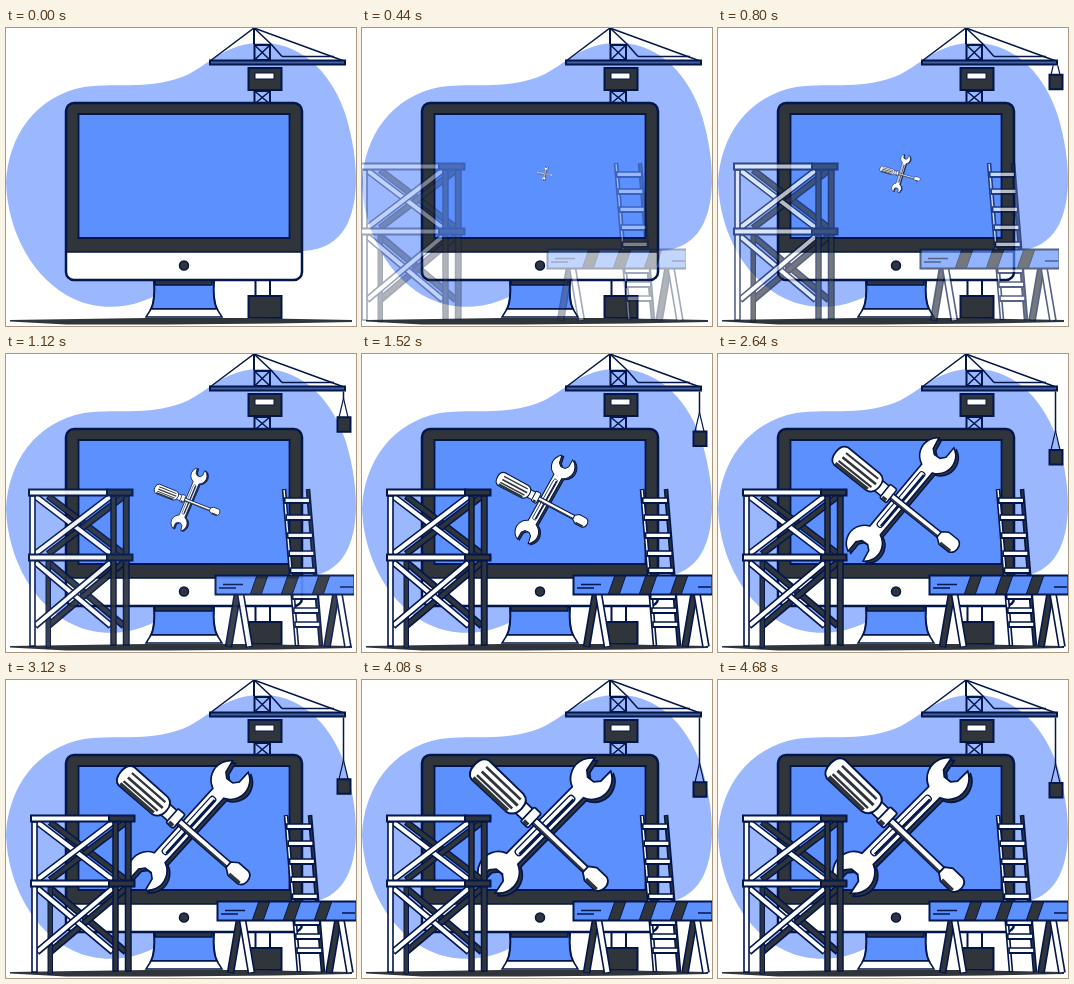
Animation, 350 px wide and 298 px high, one loop 4.8 s. Source, as an HTML page with a canvas:

```html
<!DOCTYPE html>
<html>
<head>
<meta charset="utf-8">
<style>
  html, body { margin: 0; width: 100%; height: 100%; overflow: hidden; background: #fff; }
  canvas { display: block; width: 350px; height: 298px; }
</style>
</head>
<body>
<canvas id="stage" width="350" height="298"></canvas>
<script>
const ctx = document.getElementById('stage').getContext('2d');
const NAVY = '#02164a', DARK = '#2f353b', BLUE = '#5d90ff', PALE = '#9bb8ff', WHITE = '#fff';
const LOOP = 4800, STEP = 40, LAST = 4680;

function paint(path, fill, stroke = NAVY, width = 2) {
  if (fill) { ctx.fillStyle = fill; ctx.fill(path); }
  if (stroke) { ctx.strokeStyle = stroke; ctx.lineWidth = width; ctx.stroke(path); }
}

function poly(points, fill, stroke, width) {
  const path = new Path2D();
  points.forEach(([x, y]) => path.lineTo(x, y));
  path.closePath();
  paint(path, fill, stroke, width);
}

function box(x, y, w, h, fill, stroke, width, radius = 0) {
  const path = new Path2D();
  path.roundRect(x, y, w, h, radius);
  paint(path, fill, stroke, width);
}

function line(x1, y1, x2, y2, width = 1.5, color = NAVY) {
  ctx.strokeStyle = color;
  ctx.lineWidth = width;
  ctx.beginPath();
  ctx.moveTo(x1, y1);
  ctx.lineTo(x2, y2);
  ctx.stroke();
}

// An outlined plank between two points.
function plank(x1, y1, x2, y2, width, fill = WHITE) {
  line(x1, y1, x2, y2, width + 1.6);
  const len = Math.hypot(x2 - x1, y2 - y1);
  const dx = (x2 - x1) / len, dy = (y2 - y1) / len;
  line(x1 + dx, y1 + dy, x2 - dx, y2 - dy, width - 1.6, fill);
}

// cubic-bezier(.25, .1, .25, 1)
function ease(u) {
  if (u <= 0) return 0;
  if (u >= 1) return 1;
  const curve = (s, a, b) => 3 * s * (1 - s) * (1 - s) * a + 3 * s * s * (1 - s) * b + s * s * s;
  let lo = 0, hi = 1;
  for (let i = 0; i < 24; i++) {
    const mid = (lo + hi) / 2;
    if (curve(mid, 0.25, 0.25) < u) lo = mid; else hi = mid;
  }
  return curve(lo, 0.1, 1);
}

function drawBlob() {
  paint(new Path2D(`M0 155 C2 108 30 68 78 59 C114 54 146 63 183 46
    C207 33 222 14 258 15 C300 16 328 50 340 88 C347 112 350 132 350 154
    C349 186 340 221 297 223 C230 228 190 238 165 257
    C138 280 98 285 68 271 C28 252 2 206 0 155 Z`), PALE, null);
}

function drawBrace(top, bottom) {
  box(248.5, top, 15.5, bottom - top, PALE, NAVY, 2);
  line(248.5, top, 264, bottom);
  line(264, top, 248.5, bottom);
}

function drawCrane(t) {
  line(248, 0, 204, 33);
  line(248, 0, 338, 33);
  line(248, 0, 265, 16);
  line(265, 16, 276, 28.5);
  line(276, 28.5, 328, 28.5);
  line(248, 0, 248, 16, 2);
  drawBrace(17, 32);
  drawBrace(63, 76);
  box(204, 32.5, 135, 4, '#45609f', NAVY, 2);
  box(242.5, 40, 33, 22, DARK, NAVY, 2);
  box(249, 45, 19, 6, WHITE, NAVY, 1);

  // The load comes down from behind the jib.
  const top = 104 - 134 * Math.exp(-t / 940);
  ctx.save();
  ctx.beginPath();
  ctx.rect(320, 37.5, 30, 200);
  ctx.clip();
  line(337.5, 30, 337.5, top - 18);
  line(337.5, top - 19, 333, top, 1.2);
  line(337.5, top - 19, 342, top, 1.2);
  box(331.5, top, 13, 14.5, DARK, NAVY, 2);
  ctx.restore();

  box(249.5, 250, 14.5, 20, WHITE, NAVY, 2);
  box(242.5, 268, 33, 22, DARK, NAVY, 2);
}

function drawMonitor() {
  const body = new Path2D();
  body.roundRect(60, 75, 236, 177, 8);
  paint(body, DARK, null);
  ctx.save();
  ctx.clip(body);
  box(58, 224, 240, 30, WHITE, NAVY, 1.5);
  ctx.restore();
  paint(body, null, NAVY, 2.5);
  box(72.5, 86, 211, 124, BLUE, NAVY, 1.8);
  const knob = new Path2D();
  knob.arc(178, 237.5, 4.5, 0, 7);
  paint(knob, DARK, NAVY, 1.5);
  paint(new Path2D('M148 253 H208 C207 267 208 275 211 281 H145 C148 275 149 267 148 253 Z'), BLUE, NAVY, 2);
  poly([[145, 281], [211, 281], [216, 289], [140, 289]], WHITE, NAVY, 1.5);
  box(149, 252.5, 57, 4.5, DARK, NAVY, 1.5);
}

function drawGround() {
  poly([[4, 292], [140, 290], [240, 290], [346, 292], [346, 294], [270, 295.5], [160, 296.5], [60, 296.5], [4, 293.5]], DARK, null);
}

function wrenchPath() {
  const path = new Path2D(), reach = 66.5, r = 21, half = 8;
  const neck = Math.asin(half / r), gap = 0.52, tilt = -0.1;
  for (const [cx, turn] of [[reach, 0], [-reach, Math.PI]]) {
    const mouth = tilt + turn;
    const inner = (along, side) => path.lineTo(
      cx + along * Math.cos(mouth) - side * Math.sin(mouth),
      along * Math.sin(mouth) + side * Math.cos(mouth));
    path.arc(cx, 0, r, turn - Math.PI + neck, mouth - gap);
    inner(4, -9);
    inner(-1, -4);
    inner(-1, 4);
    inner(4, 9);
    path.arc(cx, 0, r, mouth + gap, turn + Math.PI - neck);
  }
  path.closePath();
  return path;
}
const WRENCH = wrenchPath();

function drawWrench() {
  ctx.save();
  ctx.rotate(-0.785);
  ctx.translate(0, 4);
  paint(WRENCH, DARK, NAVY, 1.8);
  ctx.translate(0, -4);
  paint(WRENCH, WHITE, NAVY, 1.8);
  box(-41, -3.5, 82, 7, WHITE, NAVY, 1.3, 3);
  line(-39, 2, 39, 2, 2.5);
  ctx.restore();
}

function drawScrewdriver() {
  ctx.save();
  ctx.translate(-4, 1.5);
  ctx.rotate(0.765);
  box(-12, -3.5, 80, 7.5, WHITE, NAVY, 1.8);
  line(-10, 2.6, 64, 2.6, 2, DARK);
  paint(new Path2D('M62 -4 L69 -9 H83 Q89 -7 89 0 Q89 7 83 9 H69 L62 4 Z'), WHITE, NAVY, 1.8);
  line(69, 7, 84, 7, 3.5, DARK);
  box(-33, -7.5, 17, 15, WHITE, NAVY, 1.8, 2);
  box(-19, -10, 10, 20, WHITE, NAVY, 1.8, 2);
  line(-17, 7.5, -11, 7.5, 4, DARK);
  const grip = new Path2D('M-84 -12.5 Q-92 -11 -92 0 Q-92 12 -84 13.5 L-36 13 Q-27 11 -27 0 Q-27 -11 -36 -12 Z');
  paint(grip, WHITE, NAVY, 2);
  line(-82, -6, -34, -6, 2.5, DARK);
  line(-82, 0.5, -32, 0.5, 3, DARK);
  line(-83, 6.5, -34, 6.5, 2.5, DARK);
  line(-84, 11, -36, 11, 4, DARK);
  ctx.restore();
}

function drawTools(t) {
  const p = ease(t / LAST);
  if (!p) return;
  ctx.save();
  ctx.translate(183, 145.5);
  ctx.rotate((p - 1) * Math.PI / 5);
  ctx.scale(p, p);
  drawWrench();
  drawScrewdriver();
  ctx.restore();
}

// One frame of the scaffold: two crossed braces on each level.
function drawBraces(left, fill) {
  for (const [top, bottom] of [[142, 200], [208, 272]]) {
    plank(left, top, left + 76, bottom, 5.5, fill);
    plank(left + 76, top, left, bottom, 5.5, fill);
  }
}

function drawScaffold() {
  drawBraces(44, DARK);
  box(42, 207, 4.5, 87, DARK, NAVY, 1);
  box(119.5, 142, 5.5, 149, DARK, NAVY, 1.5);
  drawBraces(31, WHITE);
  box(26, 142, 5, 150, WHITE, NAVY, 1.6);
  box(107, 142, 5, 149, DARK, NAVY, 1.5);
  for (const y of [135.5, 200.5]) {
    box(103, y, 25.5, 6, DARK, NAVY, 2);
    box(25, y, 78, 6, WHITE, NAVY, 2);
  }
}

function drawLadder() {
  const lean = 13 / 157;
  plank(280, 135, 293, 292, 3);
  plank(304, 135, 317, 292, 3, DARK);
  for (const y of [144, 161, 179, 197, 214, 240, 254, 268]) {
    const x = 280 + (y - 135) * lean;
    box(x, y, 25, 5, WHITE, NAVY, 1.6);
    line(x, y + 5, x + 25, y + 5, 2);
  }
}

function drawBarrier() {
  for (const x of [234.5, 333]) {
    plank(x - 1, 240, x - 10, 293, 6, DARK);
    plank(x + 2, 240, x + 11, 293, 6);
  }
  const board = new Path2D();
  board.rect(211.5, 221.5, 139, 19);
  paint(board, BLUE, null);
  ctx.save();
  ctx.clip(board);
  for (const x of [246, 277, 308]) {
    poly([[x, 241], [x + 7, 221], [x + 18, 221], [x + 11, 241]], DARK, NAVY, 1);
  }
  line(219, 230.5, 239, 230.5);
  line(215, 234, 232, 234);
  line(336, 233, 349, 233);
  ctx.restore();
  paint(board, null, NAVY, 2);
}

const layer = document.createElement('canvas');
layer.width = 350;
layer.height = 298;

// Scaffold, ladder and barrier slide in together while fading as one picture.
function drawSite(t) {
  ctx.save();
  ctx.globalAlpha = Math.min(1, t / 1200);
  ctx.drawImage(layer, Math.round(-53 * (1 - ease(t / 1500))), 0);
  ctx.restore();
}

function prepareSite() {
  drawScaffold();
  drawLadder();
  drawBarrier();
  layer.getContext('2d').drawImage(ctx.canvas, 0, 0);
}

function render(t) {
  ctx.fillStyle = WHITE;
  ctx.fillRect(0, 0, 350, 298);
  drawBlob();
  drawCrane(t);
  drawMonitor();
  drawGround();
  drawTools(t);
  drawSite(t);
}

prepareSite();
const start = performance.now();
function tick() {
  const t = (performance.now() - start) % LOOP;
  render(Math.min(LAST, Math.floor(t / STEP) * STEP));
  requestAnimationFrame(tick);
}
tick();
</script>
</body>
</html>
```
